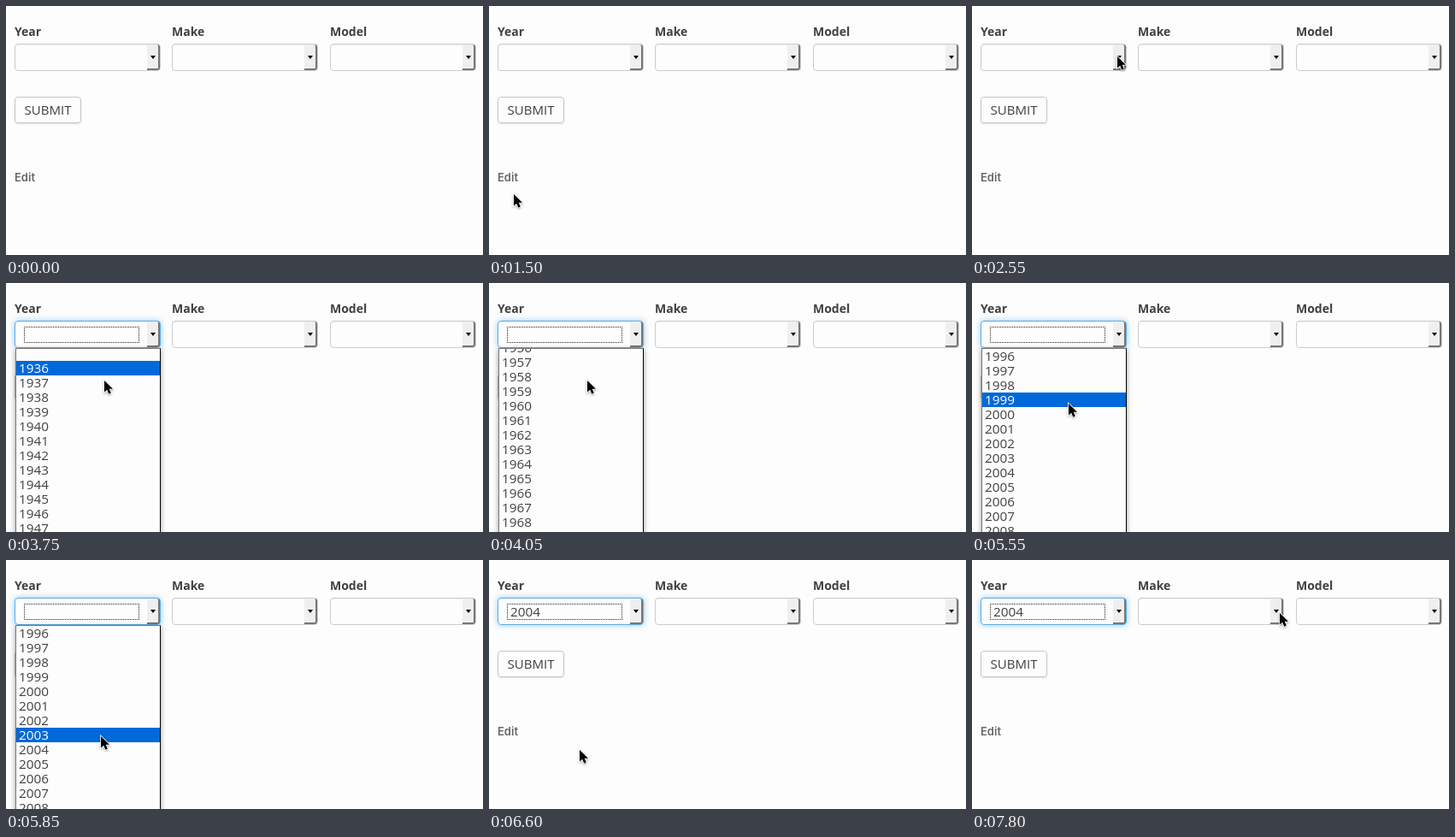
Write an HTML page that moves like this. It is 558 px wide and 291 px high and loops after 8000 ms.

```html
<!DOCTYPE html>
<html lang="en">
<head>
<meta charset="utf-8">
<title>Vehicle form</title>
<style>
  * { box-sizing: border-box; }
  html, body { margin: 0; width: 100%; height: 100%; overflow: hidden; background: #fdfdfd; }
  body { position: relative; font: 15.3px "Open Sans", "Noto Sans", sans-serif; color: #404040; }
  body > *, .select > * { position: absolute; }
  label { top: 20px; font-size: 14px; font-weight: 700; line-height: 20px; }
  .select { top: 44px; width: 171px; height: 32px; border: 1px solid #ccc; border-radius: 4px;
    box-shadow: inset 0 1px 1px rgba(0,0,0,.06); }
  .select i { top: 0; right: 0; bottom: 0; width: 15px; background: #efefef;
    border: solid #777; border-width: 0 2px 2px 0; border-radius: 0 3px 3px 0; }
  .select i::after { content: ""; position: absolute; left: 4px; top: 13px;
    border: solid transparent; border-width: 4px 3.5px 0; border-top-color: #000; }
  .focus { border-color: #5aaeee; box-shadow: inset 0 1px 1px rgba(0,0,0,.06), 0 0 7px rgba(82,168,236,.6); }
  .value { left: 10px; top: 6px; width: 135px; height: 19px; padding-left: 3px; line-height: 17px; }
  .focus .value { border: 1px dotted #222; }
  #submit { left: 10px; top: 106px; width: 78px; height: 31px; border: 1px solid #c6c6c6; border-radius: 4px;
    box-shadow: 0 1px 2px rgba(0,0,0,.12); font-size: 15px; line-height: 29px; text-align: center; }
  #edit { left: 10px; top: 191px; font: 600 13px/19px Inter, sans-serif; color: #666; }
  #popup { left: 11px; top: 76px; width: 170px; height: 240px; overflow: hidden; background: #fdfdfd;
    border: solid #777; border-width: 1px 1px 0; border-right-color: #000; box-shadow: 0 2px 6px rgba(0,0,0,.4); }
  #list div { height: 17px; padding-left: 3px; line-height: 17px; }
  #list div:first-child { height: 14px; }
  #list .on { background: #0069d9; color: #fff; }
  #cursor { left: 0; top: 0; overflow: visible; filter: drop-shadow(0 1px 1px rgba(0,0,0,.35)); }
</style>
</head>
<body>
<div id="submit">SUBMIT</div>
<div id="edit">Edit</div>
<div id="popup"><div id="list"></div></div>
<svg id="cursor" width="13" height="19">
  <path d="M1 1V14.6L4.2 11.7 6.3 16.7 8.8 15.6 6.7 10.8H11Z" stroke="#fff" stroke-width="1.6" paint-order="stroke"/>
</svg>
<script>
const $ = id => document.getElementById(id);
const LOOP = 8000, STEP = 150, ROW = 17, FIRST_YEAR = 1936, LAST_YEAR = 2015;
const OPEN = 3150, SCROLL = 3750, HOVER = 5250, CLOSE = 6600;
const MAX_SCROLL = 1034, LIST_TOP = 77, BLANK = 14;

// Cursor keys: time, x, y
const path = [
  [1350, 18, 231], [2250, 157, 63], [2550, 169, 58], [3450, 169, 58], [3750, 114, 113],
  [5100, 114, 113], [5250, 113, 117], [5400, 113, 117], [5850, 110, 205], [6300, 105, 221],
  [6750, 105, 221], [7800, 359, 61], [LOOP, 359, 61]
];

[["Year", 10], ["Make", 194], ["Model", 379]].forEach(([name, x]) =>
  $("submit").insertAdjacentHTML("beforebegin",
    `<label style="left:${x}px">${name}</label>
     <div class="select" style="left:${x}px"><span class="value"></span><i></i></div>`));

const yearSelect = document.querySelector(".select");
const yearValue = yearSelect.querySelector(".value");
const rows = [""];
for (let y = FIRST_YEAR; y <= LAST_YEAR; y++) rows.push(y);
$("list").innerHTML = rows.map(r => `<div>${r}</div>`).join("");
const rowEls = [...$("list").children];

const smooth = (t, a, b) => {
  const p = Math.min(1, Math.max(0, (t - a) / (b - a)));
  return p * p * (3 - 2 * p);
};

function cursorAt(t) {
  const i = Math.max(1, path.findIndex(k => k[0] > t));
  const [t0, x0, y0] = path[i - 1], [t1, x1, y1] = path[i];
  const p = smooth(t, t0, t1);
  return [Math.round(x0 + (x1 - x0) * p), Math.round(y0 + (y1 - y0) * p)];
}

function activeRow(t, y) {
  if (t < SCROLL) return 0;
  if (t < HOVER) return 1;
  return 1 + Math.floor((y - LIST_TOP + MAX_SCROLL - BLANK) / ROW);
}

function draw(t) {
  const [x, y] = cursorAt(t);
  $("cursor").style.visibility = t < path[0][0] ? "hidden" : "visible";
  $("cursor").style.transform = `translate(${x}px,${y}px)`;

  yearSelect.classList.toggle("focus", t >= OPEN);
  yearValue.textContent = t >= CLOSE ? "2004" : "";

  $("popup").style.visibility = t >= OPEN && t < CLOSE ? "visible" : "hidden";
  const scroll = Math.round(MAX_SCROLL * smooth(t, SCROLL, 4500));
  $("list").style.transform = `translateY(${-scroll}px)`;
  const active = activeRow(t, y);
  rowEls.forEach((el, i) => el.classList.toggle("on", i === active));
}

function tick() {
  const t = performance.now() % LOOP;
  draw(Math.floor(t / STEP) * STEP);
  requestAnimationFrame(tick);
}
tick();
</script>
</body>
</html>
```
